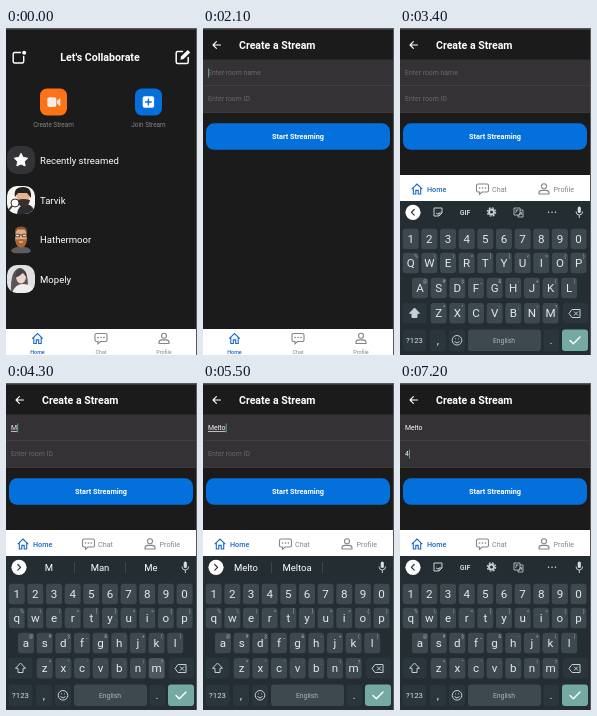
Recreate the animation shown at these times as an HTML page. Size 191x327 px, loop 7.3 s.

```html
<!DOCTYPE html>
<html lang="en">
<head>
<meta charset="utf-8">
<title>Create a stream</title>
<style>
html, body { margin: 0; width: 100%; height: 100%; overflow: hidden; background: #1b1b1c; }
svg { display: block; width: 100vw; height: 100vh; font-family: Roboto, "Open Sans", sans-serif; }
text { fill: #fff; }
.mid { text-anchor: middle; }
.bold { font-weight: 700; }
.line { fill: none; stroke: #fff; stroke-linecap: round; stroke-linejoin: round; }
.label { font-size: 6.4px; fill: #858586; }
.name { font-size: 9.55px; }
.field { font-size: 6.9px; }
.key { fill: #3e494f; }
.side { fill: #2a363b; }
.glyph { font-size: 11.6px; fill: #e3e8ea; }
.hint { font-size: 5px; fill: #a3acb0; }
.tool { fill: none; stroke: #c9d0d3; }
</style>
</head>
<body>
<svg viewBox="0 0 191 327" preserveAspectRatio="none">
  <defs>
    <clipPath id="tile"><rect width="28" height="28" rx="10"/></clipPath>
    <path id="home" d="M-5.3 .2 0-5 5.3.2M-3.7-1V5H-1.2V1.4H1.2V5H3.7V-1"/>
    <g id="chat"><path d="M-4.5-5H4.5Q6-5 6-3.5V1.5Q6 3 4.5 3H-.5L-3 5.3V3H-4.5Q-6 3-6 1.5V-3.5Q-6-5-4.5-5Z"/><path d="M-3-1h.2M-.1-1h.2M2.8-1h.2" stroke-width="1.5" stroke-linecap="round"/></g>
    <path id="profile" d="M0-5.3A2.5 2.5 0 0 1 0-.3 2.5 2.5 0 0 1 0-5.3ZM-5 5V4Q-5 1.4-2 1.4H2Q5 1.4 5 4V5Z"/>
  </defs>
  <rect width="191" height="327" fill="#1b1b1c"/>

  <g id="homePage">
    <path class="line" stroke-width="1.4" d="M14.5 24.5H8.7Q7.2 24.5 7.2 26V33.5Q7.2 35 8.7 35H16.2Q17.7 35 17.7 33.5V28.5"/>
    <circle cx="18.2" cy="24.8" r="2" fill="#fff"/>
    <text class="mid bold" x="94" y="33" font-size="10.6">Let's Collaborate</text>
    <path class="line" stroke-width="1.5" d="M176.5 23.5H171.7Q170.2 23.5 170.2 25V34Q170.2 35.5 171.7 35.5H180.7Q182.2 35.5 182.2 34V29.5"/>
    <path d="M174.5 31.7 175 28.6 181.7 21.9 184.2 24.4 177.5 31.1Z" fill="#fff"/>

    <g id="create">
      <rect x="34" y="60.5" width="27" height="27" rx="7" fill="#fb7217"/>
      <rect x="41.3" y="69.3" width="9" height="9.6" rx="2" fill="#f6ece6"/>
      <path d="M51 72.8 54.3 70V78.2L51 75.4Z" fill="#f6ece6"/>
    </g>
    <rect x="129" y="60.5" width="27" height="27" rx="7" fill="#0470dc"/>
    <rect x="136.7" y="68.3" width="11.4" height="11.4" rx="2" fill="#fff"/>
    <path class="line" style="stroke:#0470dc" stroke-width="1.5" d="M142.4 71.2V76.8M139.6 74H145.2"/>
    <text class="label mid" x="47.5" y="99">Create Stream</text>
    <text class="label mid" x="142.5" y="99">Join Stream</text>

    <rect x="1" y="118" width="28" height="28" rx="10" fill="#333335"/>
    <path id="star" fill="#fff" stroke="#fff" stroke-linejoin="round"/>
    <text class="name" x="34" y="135.7">Recently streamed</text>

    <g transform="translate(1 158)" clip-path="url(#tile)">
      <rect width="28" height="28" fill="#f6f5f3"/>
      <path d="M10 28Q11 19 19 18 27 19 28 28Z" fill="#2a2c30"/>
      <ellipse cx="16" cy="11" rx="6.5" ry="8" fill="#e5b494"/>
      <path d="M8 11Q6 1 16 1 25 1 24 12L20 7H11Z" fill="#25211f"/>
      <path d="M10 14Q16 12 23 14 22 21 16 21 11 20 10 14Z" fill="#3b2d28"/>
      <circle cx="8" cy="17" r="4" fill="#fff" stroke="#333"/>
      <path d="M5 20 1 25" stroke="#333" stroke-width="1.8"/>
    </g>
    <g transform="translate(1 197.5)" clip-path="url(#tile)">
      <path d="M3 28Q4 21 14 21 24 21 25 28Z" fill="#5c5d60"/>
      <ellipse cx="14" cy="11" rx="6" ry="9.5" fill="#e3ac83"/>
      <path d="M8 8Q7 1 14 1 21 1 20 8L18 4H10Z" fill="#8a5834"/>
      <path d="M8 14Q14 13 20 14 19 22 14 22 9 22 8 14Z" fill="#b0672f"/>
      <path d="M8.5 8.7h4v2.6h-4ZM15.5 8.7h4v2.6h-4ZM13 9.5h2" fill="#f2d6bb" stroke="#3a302b" stroke-width=".8"/>
      <path d="M12 16.5H16" stroke="#f0dacb" stroke-width="1.2"/>
    </g>
    <g transform="translate(1 237)" clip-path="url(#tile)">
      <rect width="28" height="28" fill="#e1e1e2"/>
      <path d="M4 28Q3 4 13 3 22 4 21 28Z" fill="#5a5557"/>
      <path d="M5 28Q8 19 16 19 25 19 28 28Z" fill="#f1efee"/>
      <ellipse cx="14" cy="12" rx="5" ry="6.5" fill="#efd5c8"/>
      <path d="M8 13Q8 4 14 4 20 5 20 13L16 8Q13 11 8 13Z" fill="#484346"/>
    </g>
    <text class="name" x="34" y="175.5">Tarvik</text>
    <text class="name" x="34" y="215">Hathermoor</text>
    <text class="name" x="34" y="254.7">Mopely</text>
  </g>

  <g id="createPage">
    <rect width="191" height="327" fill="#1b1b1c"/>
    <path class="line" stroke-width="1.1" d="M17.5 17H10.2M13.4 13.6 10 17 13.4 20.4"/>
    <text class="bold" x="36" y="21" font-size="10.55">Create a Stream</text>
    <rect y="31.5" width="191" height="53" fill="#343235"/>
    <path d="M0 57.5H191M0 84.5H191" stroke="#454346" stroke-width=".7"/>
    <text class="field" id="room" x="5" y="47"></text>
    <text class="field" id="roomId" x="5" y="73"></text>
    <rect id="caret" width=".9" height="9" fill="#71a69f"/>
    <rect x="3" y="95.3" width="184" height="26.5" rx="8" fill="#0470dc"/>
    <text class="mid bold" x="95" y="111.2" font-size="7.3">Start Streaming</text>
  </g>

  <g id="tabs">
    <rect width="191" height="26.5" fill="#fff"/>
    <g id="tall"></g>
    <g id="wide"></g>
  </g>

  <g id="keyboard">
    <rect y="173" width="191" height="154" fill="#232d32"/>
    <circle cx="13" cy="184.3" r="7.6" fill="#fff"/>
    <path id="chevron" class="line" style="stroke:#263238" stroke-width="1.2"/>
    <g id="tools" class="tool">
      <path d="M34 180H42V185L39 188H34ZM42 185H39V188M36 183H36.2M40 183H40.2M36 185Q38 187 39 185"/>
      <text class="mid bold" x="65" y="187" font-size="7" style="fill:#c9d0d3;stroke:none">GIF</text>
      <circle cx="91.5" cy="184" r="2.5" stroke-width="2"/>
      <circle cx="91.5" cy="184" r="4.2" stroke-width="1.2" stroke-dasharray="1.8 1.5"/>
      <path d="M114 180H120V187H114ZM118 187V189H123V182H120M115.5 182H118.5M117 182 115.5 185M119 187 121 184 122 187" stroke-width=".8"/>
      <path d="M148.5 184.2h.1M152 184.2h.1M155.5 184.2h.1" stroke-width="1.5" stroke-linecap="round"/>
    </g>
    <g id="words" font-size="9.5">
      <path d="M68.5 179V190M119.5 179V190" stroke="#48545a" stroke-width=".7"/>
      <text class="mid" x="43" y="187.7"></text>
      <text class="mid" x="94" y="187.7"></text>
      <text class="mid" x="145" y="187.7"></text>
    </g>
    <rect x="177.7" y="178.5" width="3.2" height="6.5" rx="1.6" fill="#d4dadd"/>
    <path class="tool" d="M176 183.5Q176 187 179.3 187 182.6 187 182.6 183.5M179.3 187V190"/>

    <g id="keys"></g>
    <rect class="side" id="shiftKey" x="2.5" y="275" width="24" height="20.5" rx="3"/>
    <path class="tool" id="shift" d="M14.5 280 19.5 285.3H17V289.5H12V285.3H9.5Z"/>
    <rect class="side" x="163" y="275" width="25" height="20.5" rx="3"/>
    <path class="tool" d="M169 285.5 172 281.5H180V289.5H172ZM174 283.5 178 287.5M178 283.5 174 287.5"/>
    <rect class="side" x="2.5" y="301.5" width="24" height="21.5" rx="3"/>
    <text class="mid" x="14.5" y="315" font-size="7.8" style="fill:#d9dfe1">?123</text>
    <rect class="side" x="30" y="301.5" width="16" height="21.5" rx="3"/>
    <text class="mid glyph" x="38" y="316">,</text>
    <rect class="side" x="49" y="301.5" width="16" height="21.5" rx="3"/>
    <circle class="tool" cx="57" cy="312.3" r="4.8"/>
    <path class="tool" d="M55 310.8h.8M58.2 310.8h.8M54.5 313.5Q57 316.5 59.5 313.5"/>
    <rect class="key" x="68" y="301.5" width="73" height="21.5" rx="3"/>
    <text class="mid" x="104" y="314.5" font-size="6.8" style="fill:#aab3b7">English</text>
    <rect class="side" x="143.5" y="301.5" width="15.5" height="21.5" rx="3"/>
    <text class="mid glyph" x="151" y="316">.</text>
    <rect x="162" y="301.5" width="26" height="21.5" rx="3" fill="#74aaa3"/>
    <path class="line" stroke-width="1.4" d="M170 312.5 173.3 315.8 180 309"/>
    <g id="popup">
      <rect x="-9" y="-36" width="18" height="25" rx="4" fill="#566167"/>
      <text class="mid" y="-19" font-size="13"></text>
    </g>
  </g>
  <path d="M0 0H191V327H190V1.6H0Z" fill="#59595a"/>
</svg>
<script>
const $ = id => document.getElementById(id);
const show = (id, on) => { $(id).style.display = on ? '' : 'none'; };
const move = (id, x, y) => $(id).setAttribute('transform', `translate(${x} ${y})`);
const clamp = v => Math.max(0, Math.min(1, v));

$('star').setAttribute('d', 'M' + Array.from({ length: 10 }, (_, i) => {
  const a = i * Math.PI / 5, r = i % 2 ? 3.6 : 7;
  return `${15 + r * Math.sin(a)} ${132.3 - r * Math.cos(a)}`;
}).join('L') + 'Z');

// Tab bar: icon, label, colour, tall x, wide icon x, wide label x
for (const [icon, label, color, x, wx, lx] of [
  ['home', 'Home', '#1768c7', 31.5, 17, 27],
  ['chat', 'Chat', '#858588', 95, 82.5, 92],
  ['profile', 'Profile', '#858588', 158, 144, 153.5]
]) {
  const mark = (px, py) => `<use href="#${icon}" x="${px}" y="${py}" fill="none" stroke="${color}" stroke-width="1.1"/>`;
  const style = `style="fill:${color};font-weight:${icon === 'home' ? 500 : 400}"`;
  $('tall').innerHTML += mark(x, 9.5) + `<text class="mid" x="${x}" y="24.6" font-size="5.4" ${style}>${label}</text>`;
  $('wide').innerHTML += mark(wx, 14) + `<text x="${lx}" y="16.6" font-size="7.2" ${style}>${label}</text>`;
}

// Keyboard rows: letters, hints, first centre x, centre y
const keys = {};
for (const [chars, hints, x0, y] of [
  ['1234567890', '', 10.7, 211],
  ['qwertyuiop', '%\\|=[]<>{}', 10.7, 235],
  ['asdfghjkl', '@#$_&-+()', 20, 260],
  ['zxcvbnm', '*"\':;!?', 38.7, 285.3]
]) [...chars].forEach((c, i) => {
  const x = x0 + i * 18.65, g = document.createElementNS('http://www.w3.org/2000/svg', 'g');
  g.innerHTML = `<rect class="key" x="${x - 8}" y="${y - 10.3}" width="16" height="20.6" rx="3"/>
    <text class="mid glyph" x="${x}" y="${y + 3.8}">${c}</text><text class="mid hint" x="${x + 5.3}" y="${y - 4.8}"></text>`;
  g.lastElementChild.textContent = hints[i] || '';
  $('keys').append(g);
  keys[c] = { x, y, box: g.children[0], text: g.children[1] };
});

const presses = [['m', 3700, 4100], ['e', 4500, 4700], ['l', 4800, 5000], ['t', 5200, 5400], ['o', 5400, 5500], ['4', 6600, 7000]];
const typed = [
  [4000, 'M', 'Man', 'Me'], [4600, 'Me', 'Men', 'Met'], [4900, 'Mel', 'Melt', 'Melon'],
  [5300, 'Melt', 'Melts', ''], [5500, 'Melto', 'Meltoa', '']
];
const caretOn = [[2000, 2300], [2900, 3400], [3900, 6300], [6800, 7300]];
const within = (t, [a, b]) => t >= a && t < b;

function field(id, value, placeholder) {
  $(id).textContent = value || placeholder;
  $(id).style.fill = value ? '#fff' : '#69686b';
}

function draw(t) {
  const enter = clamp((t - 1300) / 200), open = t >= 2300;
  $('create').style.opacity = 1 - .78 * clamp((t - 800) / 400);
  show('createPage', enter);
  $('createPage').style.opacity = enter;
  move('createPage', 0, 12 * (1 - enter));

  move('tabs', 0, open ? 147 : 301);
  show('tall', t < 2600);
  show('wide', t >= 2600);
  show('keyboard', t >= 2200);
  move('keyboard', 0, open ? 0 : 70);

  const entry = typed.filter(e => t >= e[0]).pop();
  const name = entry ? entry[1] : '', number = t >= 6800 ? '4' : '';
  const onId = t >= 5900, suggest = entry && !onId;
  field('room', name, 'Enter room name');
  field('roomId', number, 'Enter room ID');
  $('room').style.textDecoration = suggest ? 'underline' : 'none';
  const active = onId ? number : name;
  const width = active ? $(onId ? 'roomId' : 'room').getComputedTextLength() : 0;
  move('caret', 5.2 + width, onId ? 66.5 : 40.5);
  show('caret', caretOn.some(r => within(t, r)));

  show('tools', !suggest);
  show('words', suggest);
  $('chevron').setAttribute('d', suggest ? 'M11.8 181.5 14.6 184.3 11.8 187.1' : 'M14.2 181.5 11.4 184.3 14.2 187.1');
  if (suggest) [...$('words').querySelectorAll('text')].forEach((w, i) => { w.textContent = entry[i + 1]; });

  const upper = within(t, [2900, 4000]);
  $('shift').style.fill = upper ? '#c9d0d3' : 'none';
  $('shiftKey').style.fill = within(t, [2800, 3100]) ? '#5b666c' : '';
  const press = presses.find(([, a, b]) => within(t, [a, b]));
  for (const c in keys) {
    keys[c].text.textContent = upper ? c.toUpperCase() : c;
    const faint = c === 'm' && within(t, [4100, 4400]);
    keys[c].box.style.fill = press && press[0] === c ? '#5b666c' : faint ? '#4d585e' : '';
  }
  show('popup', press);
  if (press) {
    const k = keys[press[0]];
    move('popup', k.x, k.y);
    $('popup').lastElementChild.textContent = k.text.textContent;
  }
}

const start = performance.now();
function tick() {
  const t = (performance.now() - start) % 7300;
  draw(Math.floor(t / 100) * 100);
  requestAnimationFrame(tick);
}
tick();
</script>
</body>
</html>
```
